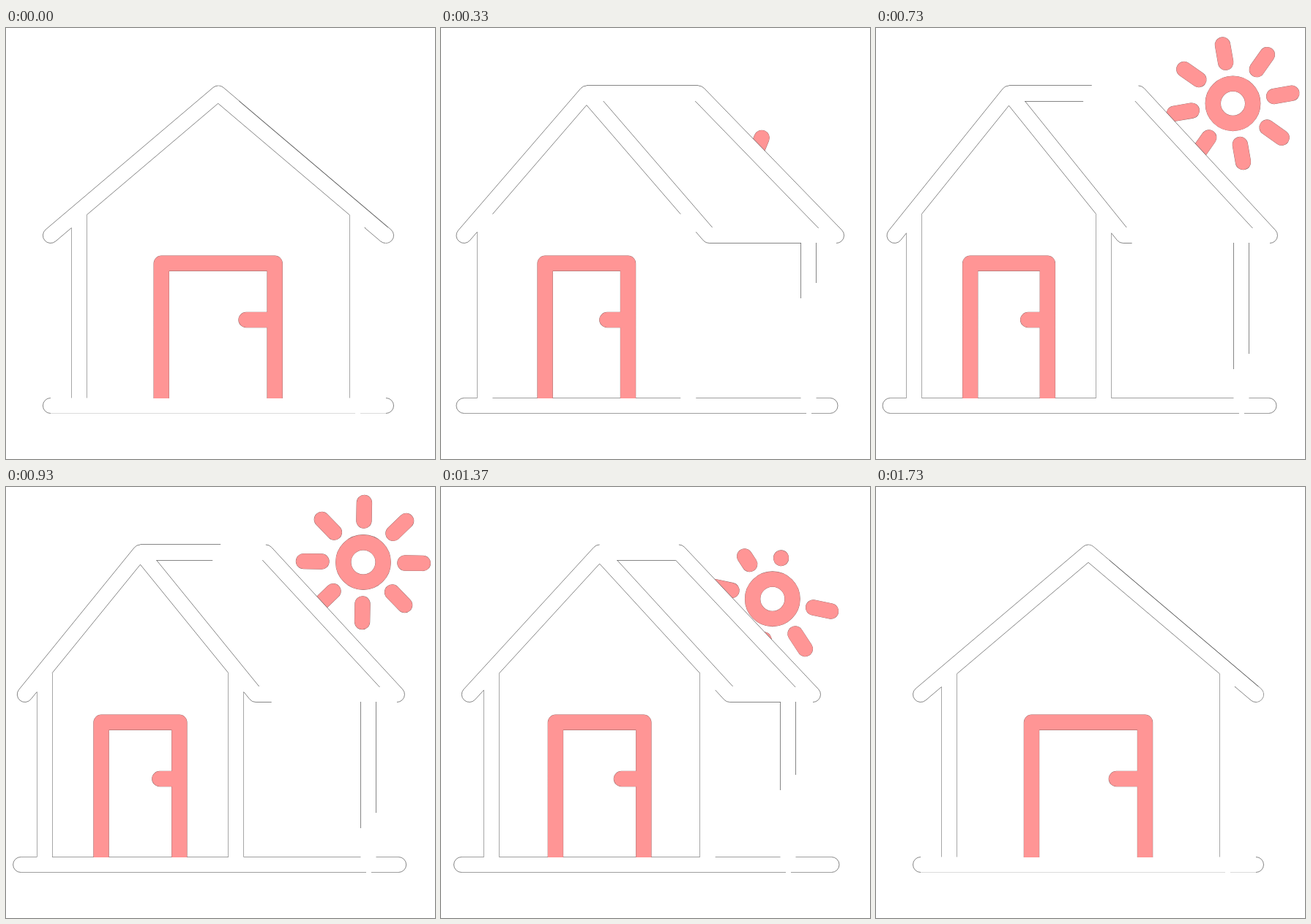
Recreate the animation shown at these times as an HTML page with a canvas. Size 586 by 590 pixels, loop 2000 ms.

```html
<!DOCTYPE html>
<html lang="en">
<head>
<meta charset="utf-8">
<title>House and sun</title>
<style>
html, body { margin: 0; width: 100%; height: 100%; overflow: hidden; background: #fff; }
canvas { display: block; }
</style>
</head>
<body>
<canvas id="stage" width="586" height="590"></canvas>
<script>
const ctx = document.getElementById('stage').getContext('2d');
const LOOP = 2000, PI = Math.PI;
const R = 10.5, TOP = 89.5, END = 284, H = END - TOP;
const EAVE = 294.5, FLOOR = 506.5, BASE = 517;
const PINK = '#ff9595', INK = '#444';

// House pose at each key time
const times = [0, 330, 530, 730, 1000, 1130, 1370, 1730];
const house = {
  wallL:    [100, 60, 51, 52, 53, 57.4, 69, 100],
  wallR:    [480, 338, 303, 311, 316, 333.5, 364, 480],
  backTop:  [290, 351.5, 366, 358.5, 353, 339, 325, 290],
  backEnd:  [519, 540, 546, 538, 532, 519, 508, 519],
  backWall: [480, 502, 507, 499, 493, 480, 474, 480],
  baseL:    [61, 31.5, 18.5, 19.5, 20.5, 24, 28, 61],
  baseR:    [519, 531.5, 536.5, 536.5, 536, 534.5, 533.5, 519],
  ridge:    [0, 1, 0, .64, .64, .55, 0, 0],
  ridgeIn:  [0, 0, 0, .53, .53, .49, 1, 0],
  eave:     [0, 1, .52, .08, .2, .64, 1, 0]
};
// Which edges show around each key time
const shown = { outL: '11111011', inL: '10111111', inR: '10111011', outR: '00111000', floor: '01111110' };
const postFrom = [294, 294, 422, 294, 294, 455, 294, 294];
const postTo = [294, 370, 506, 467, 467, 506, 415, 294];

const sunTimes = [250, 330, 530, 730, 900, 1130, 1370, 1600];
const sun = {
  x:    [370, 407, 479.5, 487.5, 488, 487.5, 453, 395],
  y:    [282, 226.5, 115, 103.3, 103, 103.5, 153, 240],
  turn: [-38, -23, 9, 35, 46, 45.8, 12, -25]
};

// Monotone cubic through the keys
function at(ts, vs, t) {
  const last = ts.length - 1;
  if (t <= ts[0]) return vs[0];
  if (t >= ts[last]) return vs[last];
  let i = 0;
  while (t >= ts[i + 1]) i++;
  const slope = j => (vs[j + 1] - vs[j]) / (ts[j + 1] - ts[j]);
  const tangent = j => {
    if (j === 0) return slope(0);
    if (j === last) return slope(last - 1);
    const a = slope(j - 1), b = slope(j);
    return a * b <= 0 ? 0 : 2 * a * b / (a + b);
  };
  const d = ts[i + 1] - ts[i], u = (t - ts[i]) / d, w = 1 - u;
  return vs[i] * w * w * (1 + 2 * u) + vs[i + 1] * u * u * (1 + 2 * w)
    + d * u * w * (w * tangent(i) - u * tangent(i + 1));
}

const pose = (ts, set, t) =>
  Object.fromEntries(Object.entries(set).map(([k, vs]) => [k, at(ts, vs, t)]));

const nearest = t => times.reduce((best, v, i) =>
  Math.abs(v - t) < Math.abs(times[best] - t) ? i : best, 0);

const clamp = v => Math.max(0, Math.min(1, v));

function line(...p) {
  ctx.beginPath();
  for (let i = 0; i < p.length; i += 2) ctx.lineTo(p[i], p[i + 1]);
  ctx.stroke();
}

const snap = v => Math.floor(v) + .5;
const post = (x, y0, y1) => { if (y1 > y0) line(snap(x), y0, snap(x), y1); };
const rail = (y, x0, x1) => { if (x1 - x0 > 1) line(x0, y, x1, y); };

function pinkStroke(path) {
  ctx.lineCap = ctx.lineJoin = 'round';
  for (const [color, width] of [['#86605f', 21.4], [PINK, 20.8]]) {
    ctx.strokeStyle = color;
    ctx.lineWidth = width;
    ctx.stroke(path);
  }
}

function thinPen() {
  ctx.lineCap = 'butt';
  ctx.strokeStyle = INK;
  ctx.lineWidth = .65;
}

function drawSun(t) {
  if (t < 250 || t > 1600) return;
  const s = pose(sunTimes, sun, t), p = new Path2D();
  p.arc(s.x, s.y, 27.2, 0, 2 * PI);
  for (let i = 0; i < 8; i++) {
    const grow = clamp((t - 200 - i * 56) / 130);
    const shrink = clamp((t - 1205 - i * 56) / 112);
    const size = grow * (1 - shrink);
    if (!size) continue;
    const a = (45 - 45 * i + s.turn) * PI / 180;
    const dx = Math.sin(a), dy = -Math.cos(a), far = 57 + Math.max(.02, 24.5 * size);
    p.moveTo(s.x + dx * 57, s.y + dy * 57);
    p.lineTo(s.x + dx * far, s.y + dy * far);
  }
  pinkStroke(p);
}

function backOutline(h) {
  const a = Math.atan2(H, h.backEnd - h.backTop);
  ctx.beginPath();
  ctx.arc(h.backTop, TOP, R, -PI / 2, a - PI / 2);
  ctx.arc(h.backEnd, END, R, a - PI / 2, PI / 2);
}

// x at height y on a roof edge, pushed sideways by half a stroke
function edgeX(x0, x1, side, y) {
  const dx = x1 - x0;
  return x0 + (y - TOP) * dx / H + side * R * Math.hypot(dx, H) / H;
}

function drawBack(h, f, k) {
  backOutline(h);
  ctx.lineTo(h.backEnd, 520);
  ctx.lineTo(f.apex, 520);
  ctx.lineTo(f.apex, TOP - R);
  ctx.fillStyle = '#fff';
  ctx.fill();

  thinPen();
  backOutline(h);
  ctx.stroke();
  const inner = y => edgeX(h.backTop, h.backEnd, -1, y);
  line(inner(100), 100, inner(274), 274);
  rail(78.5, f.apex, f.apex + (h.backTop - f.apex) * h.ridge);
  const start = edgeX(f.apex, f.right, 1, 100);
  rail(100.5, start, start + (inner(100) - start) * h.ridgeIn);
  rail(EAVE, f.right, f.right + (h.backWall - R - f.right) * h.eave);
  const from = postFrom[k], to = postTo[k];
  post(h.backWall - R, from, to);
  post(h.backWall + R, Math.max(294, from - 21), to === 506 ? to : Math.max(294, to - 21));
}

function drawFront(h, f, on) {
  const { apex, left, right } = f, { wallL, wallR } = h;
  const half = right - apex, a = Math.atan2(H, half);
  const under = x => TOP + R * Math.hypot(half, H) / half + Math.abs(x - apex) * H / half;

  // White front face hides what lies behind it
  ctx.fillStyle = ctx.strokeStyle = '#fff';
  ctx.lineCap = ctx.lineJoin = 'round';
  ctx.lineWidth = 20;
  line(left, END, apex, TOP, right, END);
  ctx.beginPath();
  ctx.moveTo(apex, TOP);
  ctx.lineTo(wallR + 10, under(wallR));
  ctx.lineTo(wallR + 10, FLOOR);
  ctx.lineTo(wallL - 10, FLOOR);
  ctx.lineTo(wallL - 10, under(wallL));
  ctx.fill();

  thinPen();
  ctx.beginPath();
  ctx.arc(apex, TOP, R, -PI / 2, -PI / 2 - a, true);
  ctx.arc(left, END, R, -PI / 2 - a, -1.5 * PI - a, true);
  ctx.lineTo(wallL - R, under(wallL - R));
  ctx.stroke();

  ctx.beginPath();
  ctx.arc(right, END, R, PI / 2, PI / 2 + a);
  ctx.lineTo(wallR + R, under(wallR + R));
  ctx.stroke();

  line(wallL + R, under(wallL + R), apex, under(apex), wallR - R, under(wallR - R));
  line(edgeX(apex, right, 1, 100), 100, edgeX(apex, right, 1, 273), 273);

  ctx.strokeStyle = '#777';
  if (on('outL')) post(wallL - R, under(wallL - R), FLOOR);
  if (on('inL')) post(wallL + R, under(wallL + R), FLOOR);
  if (on('inR')) post(wallR - R, under(wallR - R), FLOOR);
  if (on('outR')) post(wallR + R, under(wallR + R), FLOOR);
}

function drawBase(h, on) {
  thinPen();
  for (const [x, a] of [[h.baseL, PI / 2], [h.baseR, -PI / 2]]) {
    ctx.beginPath();
    ctx.arc(x, BASE, R, a, a + PI);
    ctx.stroke();
  }
  ctx.globalAlpha = on('floor') ? .8 : .3;
  rail(527.5, h.baseL, h.backWall - 3);
  rail(527.5, h.backWall + 4, h.baseR);
  ctx.globalAlpha = .8;
  if (on('floor')) {
    rail(FLOOR, h.baseL, h.wallL - R);
    rail(FLOOR, h.wallL + R, h.wallR - R);
    rail(FLOOR, h.wallR + R, h.backWall - R);
    rail(FLOOR, h.backWall + R, h.baseR);
  }
  ctx.globalAlpha = 1;
}

function drawDoor(h) {
  const x = u => h.wallL + (h.wallR - h.wallL) * u;
  const l = x(.296), r = x(.704), p = new Path2D();
  p.moveTo(l, 530);
  p.lineTo(l, 322.2);
  p.lineTo(r, 322.2);
  p.lineTo(r, 530);
  p.moveTo(x(.601), 399.5);
  p.lineTo(r, 399.5);
  ctx.save();
  ctx.beginPath();
  ctx.rect(0, 0, 586, 507);
  ctx.clip();
  pinkStroke(p);
  ctx.restore();
}

function draw(t) {
  const h = pose(times, house, t), k = nearest(t);
  const on = name => shown[name][k] === '1';
  const over = (h.wallR - h.wallL) * .1026;
  const f = { apex: (h.wallL + h.wallR) / 2, left: h.wallL - over, right: h.wallR + over };
  ctx.fillStyle = '#fff';
  ctx.fillRect(0, 0, 586, 590);
  drawSun(t);
  drawBack(h, f, k);
  drawFront(h, f, on);
  drawBase(h, on);
  drawDoor(h);
}

const begin = performance.now();
function tick() {
  draw((performance.now() - begin) % LOOP);
  requestAnimationFrame(tick);
}
tick();
</script>
</body>
</html>
```
